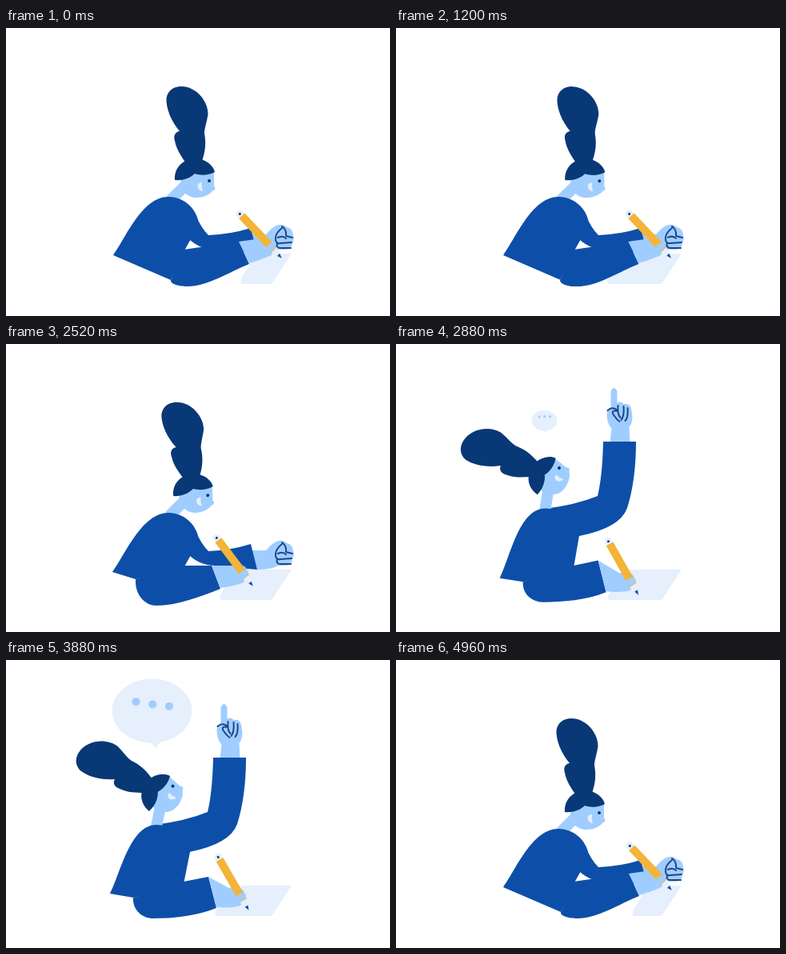
An HTML page with a canvas that plays this animation: 480x360 px, repeating every 5 s.

```html
<!DOCTYPE html>
<html lang="en">
<head>
<meta charset="utf-8">
<title>Writer with an idea</title>
<style>
html, body { margin: 0; width: 100%; height: 100%; overflow: hidden; background: #fff; }
canvas { display: block; width: 480px; height: 360px; }
</style>
</head>
<body>
<canvas id="stage" width="480" height="360"></canvas>
<script>
const ctx = document.getElementById('stage').getContext('2d');
const LOOP = 5000;
const BLUE = '#0d4fa8', NAVY = '#093876', SKIN = '#a0cdff', PALE = '#e6effc',
      YELLOW = '#f3b437', LINE = '#1d478a';

const ease = {
  both: u => u * u * (3 - 2 * u),
  in: u => u * u,
  out: u => u * (2 - u),
  flat: u => u
};
const mix = (a, b, u) => Array.isArray(a) ? a.map((v, i) => v + (b[i] - v) * u) : a + (b - a) * u;

// Keys are [time, value, easing towards this key].
function track(keys, t) {
  let i = 1;
  while (i < keys.length - 1 && t > keys[i][0]) i++;
  const [t0, a] = keys[i - 1], [t1, b, kind = 'both'] = keys[i];
  const u = Math.min(1, Math.max(0, (t - t0) / (t1 - t0)));
  return mix(a, b, ease[kind](u));
}

// head x, y, tilt, hair tilt | neck | hem | shoulder | chest | elbow | underside | cuff low | cuff high | pencil end | pencil tip
const right = [236,185,0,0, 207,214, 134,284, 203,211, 241,246, 206,315, 227,323, 304,295, 291,267, 292,232, 344,287];
const middle = [247.5,193,9,1, 213,218, 135,282, 209,214, 245,247, 182,304, 208,330, 288,305, 275,277, 279,241, 326,298];
const left = [256.5,201,16,11, 220,220, 137,278, 212,217, 249,247, 153,291, 177,331, 262,293, 248,266, 245,231, 300,283];
const upright = [234,184,-2.5,0, 206,213, 133,285, 203,211, 241,246, 162,294, 188,327, 268,306, 257,277, 263,242, 308,302];
const back = [192,167,-48,-6, 188,208, 130,292, 188,206, 230,240, 159,297, 184,323, 263,310, 253,271, 265,246, 303,312];
const idea = [212.5,172,-30,0, 198,210, 131,289, 197,208, 231,230, 158,296, 184,324, 263,308, 255,281, 263,245, 304,312];

const poseKeys = [
  [0, right], [480, left], [680, middle, 'in'], [1100, right, 'out'], [1160, right],
  [1720, left], [2220, middle, 'in'], [2500, upright, 'out'], [2540, upright],
  [2930, mix(upright, back, 1.14)], [3200, back], [3960, back], [4180, idea],
  [4270, idea], [4500, upright], [4560, upright], [4940, right], [5000, right]
];

// Far sleeve: upper edge, cuff, lower edge.
const armRest = [236,232, 244,250, 253,259, 280,258, 306,250, 314,282, 290,280, 262,277, 240,277, 225,260];
const armUp = [186,206, 225,201, 252,190, 258,165, 259,122, 300,122, 300,170, 289,205, 280,230, 229,240];
const armPoint = [222,220, 240,236, 262,246, 285,236, 318,219, 338,253, 305,270, 270,281, 255,284, 225,270];
const armKeys = [[0, armRest], [2560, armRest], [2860, armUp], [3960, armUp],
  [4160, armPoint], [4280, armPoint], [4490, armRest], [5000, armRest]];

const paperKeys = [[0, 293], [680, 270, 'flat'], [1720, 257], [2520, 267], [3320, 261],
  [3960, 261], [4150, 333], [4300, 333], [5000, 293, 'flat']];
const bubbleKeys = [[2820, 0], [3000, 1.2], [3140, 1], [3980, 1], [4080, 0]];

const fill = (d, color) => { ctx.fillStyle = color; ctx.fill(new Path2D(d)); };
function stroke(d, color, width, cap = 'round') {
  ctx.strokeStyle = color;
  ctx.lineWidth = width;
  ctx.lineCap = cap;
  ctx.lineJoin = 'round';
  ctx.stroke(new Path2D(d));
}
function oval(x, y, rx, ry, color, angle = 0) {
  ctx.fillStyle = color;
  ctx.beginPath();
  ctx.ellipse(x, y, rx, ry, angle, 0, 7);
  ctx.fill();
}
const dot = (x, y, r, color) => oval(x, y, r, r, color);
function placed(x, y, angle, draw) {
  ctx.save();
  ctx.translate(x, y);
  ctx.rotate(angle);
  draw();
  ctx.restore();
}
const rad = deg => deg * Math.PI / 180;

function drawPaper(t) {
  const x = track(paperKeys, t);
  if (x > 331) return;
  fill(`M${x + 3},320 Q${x - 1},319 ${x + 1},314 L${x + 19},282 L357,282 L332,320 Z`, PALE);
}

function drawBubble(t) {
  const size = track(bubbleKeys, t);
  if (size <= 0) return;
  ctx.save();
  ctx.translate(187, 111);
  ctx.scale(size, size);
  ctx.translate(-187, -111);
  oval(182.5, 63.5, 50, 40, PALE);
  fill('M176,101 Q184,104 188,112 Q189,104 196,100 Z', PALE);
  for (let i = 0; i < 3; i++) {
    const phase = (t - 3320) / 600 * 2 * Math.PI - (i - 1) * 0.55;
    dot(162.5 + i * 20.7, 53 - 6 * Math.sin(phase), 5, SKIN);
  }
  ctx.restore();
}

function drawSparks(t) {
  if (t < 4060 || t > 4400) return;
  const r = track([[4060, 14], [4200, 36, 'out'], [4400, 38]], t);
  const half = track([[4060, 3], [4180, 8.5], [4250, 8.5], [4400, 0]], t);
  for (let i = 0; i < 4; i++) {
    placed(187, 63, rad(-119 + 90 * i), () => {
      const dash = `M${r - half},0 L${r + half},0`;
      if (i === 3) stroke(`M${r - half},-6 L${r + half},-6`, '#fff', 9, 'butt');
      stroke(dash, PALE, 5);
      stroke(dash, PALE, 9, 'butt');
    });
  }
}

function drawFist() {
  ctx.translate(-310, -266);
  fill('M307,258 L325,258 Q333,249 338,247 Q346,244 351,249 Q359,251 359,259 Q361,264 358,268 Q358,277 349,277 L340,277 Q333,282 314,282 Z', SKIN);
  stroke('M345,248 Q351,252 350,260 L358,262 M345,250 Q336,257 337,265 Q338,270 343,269 L357,268 M339,269 Q337,275 343,275 L356,275 M340,262 Q346,259 350,263', LINE, 2);
}

function drawPointingHand() {
  ctx.translate(-281, -122);
  fill('M269,123 L271,106 Q265,99 265,88 Q265,81 270,79 L270,59 Q274,51 278,59 L278,74 Q282,70 286,75 Q295,73 296,84 Q299,96 293,104 L294,123 Z', SKIN);
  stroke('M266,83 Q273,77 279,84 Q270,82 273,88 Q277,94 281,97 M279,77 Q278,88 282,92 M286,78 Q287,90 283,95 M291,80 Q292,92 288,96', LINE, 2);
}

function drawFarArm(t, headX) {
  const a = track(armKeys, t);
  const lift = t < 2560 ? Math.max(0, headX - 236) * 0.2 : 0;
  const [ax, ay, bx, by] = a.slice(8, 12);
  const angle = Math.atan2(by - ay, bx - ax);
  const isFist = t < 2660 || t > 4410;
  placed((ax + bx) / 2 - lift / 2, (ay + by) / 2 - lift, isFist ? angle - rad(76) : angle,
    isFist ? drawFist : drawPointingHand);
  const p = i => `${a[2 * i]},${a[2 * i + 1] + (i === 2 ? lift : 0)}`;
  fill(`M${p(0)} Q${p(1)} ${p(2)} Q${p(3)} ${p(4)} L${p(5)} Q${p(6)} ${p(7)} Q${p(8)} ${p(9)} Z`, BLUE);
}

function drawNeck([x, y, tilt, , nx, ny]) {
  const c = Math.cos(rad(tilt)), s = Math.sin(rad(tilt));
  stroke(`M${nx},${ny} L${x - 12 * c - 12 * s},${y - 12 * s + 12 * c}`, SKIN, 14);
}

function drawTorso(p) {
  const [lx, ly, hx, hy, rx, ry, ex, ey] = p.slice(6, 14);
  fill(`M${lx},${ly} C${lx + (hx - lx) * 0.23},${ly + (hy - ly) * 0.3} ${hx - 33},${hy} ${hx},${hy}
    C${hx + 21},${hy} ${rx - 1},${ry - 18} ${rx},${ry} L222,280 L${ex},${ey} Z`, BLUE);
}

function drawHead([x, y, tilt, hairTilt]) {
  placed(x, y, rad(tilt), () => {
    ctx.translate(-236, -185);
    fill('M218,184 C217,202 225,212 238,212 C248,212 257,207 259,202 L260,196 L260,178 L236,172 Z', SKIN);
    dot(258.5, 200.3, 2.8, SKIN);
    fill('M245,193 C237,193 238,203 246,204 Q244,199 245,193 Z', PALE);
    dot(254, 191, 2, NAVY);
    fill('M211,190 C210,173 223,163 238,163 C249,164 259,171 261,180 C252,185 242,184 236,182 C230,188 220,191 211,190 Z', NAVY);
    placed(236, 180, rad(hairTilt), () => {
      ctx.translate(-236, -180);
      fill('M217,129 C206,116 200,100 200.5,88 C202,78 210,73 219,73 C238,73 253,92 252.5,108 C251,118 248,125 248,132 C250,142 250,154 244,169 L225,169 C219,160 213,152 211,141 C209,135 211,130 217,129 Z', NAVY);
    });
  });
}

function drawPencil(cx, cy, tx, ty) {
  const length = Math.hypot(tx - cx, ty - cy);
  placed(cx, cy, Math.atan2(ty - cy, tx - cx), () => {
    dot(0.5, 0, 4.8, PALE);
    ctx.fillStyle = YELLOW;
    ctx.fillRect(4, -5, length - 17, 10);
    fill(`M${length - 13},-5 L${length},0 L${length - 13},5 Z`, PALE);
    fill(`M${length - 5},-2.2 L${length + 1},0 L${length - 5},2.2 Z`, BLUE);
    dot(0.5, 0, 1.5, NAVY);
  });
}

function drawNearArm(p) {
  const [ex, ey, ux, uy, lx, ly, hx, hy, cx, cy, tx, ty] = p.slice(12);
  fill(`M${ex},${ey} C${ex - 1},${ey + (uy - ey) * 0.6} ${ux - (ux - ex) * 0.55},${uy} ${ux},${uy}
    C${ux + 25},${uy} ${lx - 25},${ly + 10} ${lx},${ly} L${hx},${hy} L222,277 Z`, BLUE);
  const gx = mix(cx, tx, 0.75), gy = mix(cy, ty, 0.75);
  fill(`M${hx},${hy} L${gx - 14},${gy - 10} Q${gx},${gy - 13} ${gx + 4},${gy - 6}
    Q${gx + 7},${gy + 5} ${gx},${gy + 11} Q${gx - 8},${gy + 15} ${lx},${ly - 1} Z`, SKIN);
  drawPencil(cx, cy, tx, ty);
  oval(gx, gy + 1, 4.5, 7, SKIN, Math.atan2(ty - cy, tx - cx));
}

function draw(t) {
  ctx.fillStyle = '#fff';
  ctx.fillRect(0, 0, 480, 360);
  const pose = track(poseKeys, t);
  drawPaper(t);
  drawBubble(t);
  drawFarArm(t, pose[0]);
  drawNeck(pose);
  drawTorso(pose);
  drawHead(pose);
  drawNearArm(pose);
  drawSparks(t);
}

const start = performance.now();
function frame() {
  draw((performance.now() - start) % LOOP);
  requestAnimationFrame(frame);
}
frame();
</script>
</body>
</html>
```
